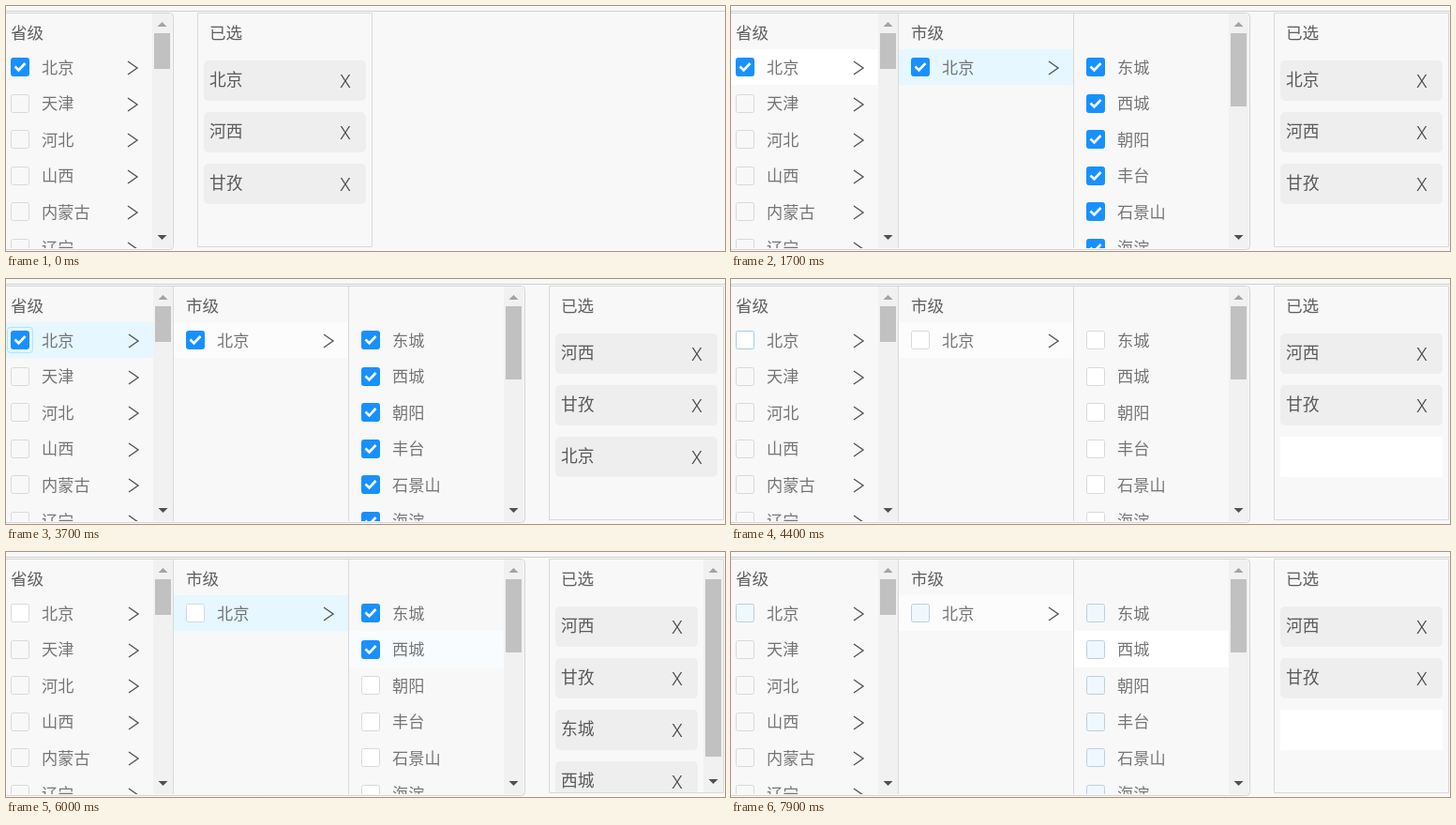
Recreate the animation shown at these times as an HTML page with a canvas. Size 767x261 px, loop 8 s.

```html
<!DOCTYPE html>
<html lang="zh-CN">
<head>
<meta charset="utf-8">
<style>
html, body { margin: 0; width: 100%; height: 100%; overflow: hidden; background: #f8f8f8; }
canvas { display: block; }
</style>
</head>
<body>
<canvas id="stage" width="767" height="261"></canvas>
<script>
const ctx = document.getElementById('stage').getContext('2d');
const LOOP = 8000;
const ROW = 38.5;
const SANS = '"Noto Sans CJK SC", "Noto Sans CJK", sans-serif';
const PLAIN = [248, 248, 248], WHITE = [255, 255, 255], HOVER = [230, 247, 255];
const PALE = [252, 252, 252], BLUE = [24, 144, 255], GREY = [217, 217, 217];
const provinces = ['北京', '天津', '河北', '山西', '内蒙古', '辽宁'];
const districts = ['东城', '西城', '朝阳', '丰台', '石景山', '海淀'];

// Row backgrounds: [time, colour], held until the next key.
const provinceBg = [[0, PLAIN], [500, HOVER], [900, [245, 252, 255]], [1000, WHITE],
  [2600, [240, 250, 255]], [2700, HOVER], [4200, [238, 248, 253]], [4300, [245, 248, 250]], [4400, PLAIN]];
const secondBg = [[0, PLAIN], [300, HOVER], [500, PLAIN]];
const cityBg = [[0, PLAIN], [1200, HOVER], [2600, [245, 251, 254]], [2700, PALE],
  [4700, PLAIN], [5800, HOVER], [6700, [242, 250, 254]], [6800, PALE]];
const eastBg = [[0, PLAIN], [4700, HOVER], [5100, PLAIN]];
const westBg = [[0, PLAIN], [5100, HOVER], [5900, [240, 250, 255]], [6000, [248, 252, 255]], [6700, WHITE]];

// Toggles: [time, checked].
const linked = [[0, 1], [2000, 0], [3500, 1], [4100, 0], [6400, 1], [7800, 0]];
const withPick = time => [...linked.slice(0, 4), [time, 1], [7800, 0]];
const east = withPick(5100), west = withPick(5600);

const tagSets = [
  [0, ['北京', '河西', '甘孜']], [2000, ['河西', '甘孜', '']], [3500, ['河西', '甘孜', '北京']],
  [4100, ['河西', '甘孜', '']], [5100, ['河西', '甘孜', '东城']],
  [5600, ['河西', '甘孜', '东城', '西城']], [6400, ['河西', '甘孜', '北京']], [7800, ['河西', '甘孜', '']]
];

const rgb = c => `rgb(${c.map(Math.round)})`;
const mix = (a, b, k) => a.map((v, i) => v + (b[i] - v) * k);
const keyAt = (keys, t) => keys.filter(k => k[0] <= t).pop();
const valueAt = (keys, t) => keyAt(keys, t)[1];

// How blue a checkbox is, fading over a few ticks after a toggle.
function fillAt(keys, t) {
  const [start, on] = keyAt(keys, t);
  if (!start) return on;
  const fade = on ? [.12, .6] : [.5, .07];
  return fade[Math.round((t - start) / 100)] ?? on;
}

function rect(x, y, w, h, color) {
  ctx.fillStyle = color;
  ctx.fillRect(x, y, w, h);
}

function rounded(x, y, w, h, r, fill, stroke) {
  ctx.beginPath();
  ctx.roundRect(x, y, w, h, r);
  if (fill) { ctx.fillStyle = fill; ctx.fill(); }
  if (stroke) { ctx.strokeStyle = stroke; ctx.lineWidth = 1; ctx.stroke(); }
}

function line(points, color, width) {
  ctx.beginPath();
  points.forEach(([x, y]) => ctx.lineTo(x, y));
  ctx.strokeStyle = color;
  ctx.lineWidth = width;
  ctx.stroke();
}

function text(s, x, y, size, color, family = SANS) {
  ctx.font = `300 ${size}px ${family}`;
  ctx.fillStyle = color;
  ctx.fillText(s, x, y);
}

const title = (s, x) => text(s, x, 34.5, 17.6, '#606060');

function checkbox(x, y, fill, base, edge = GREY) {
  const edgeBlue = fill > .1 ? 1 : fill * 2;
  rounded(x + .5, y + .5, 19, 19, 2, rgb(mix(base, BLUE, fill)), rgb(mix(edge, BLUE, edgeBlue)));
  if (fill > .5) line([[x + 4.5, y + 9.5], [x + 8.5, y + 13.5], [x + 15.5, y + 6]], '#fff', 2.6);
}

// Ring that spreads from a clicked checkbox.
function ripple(x, y, t, start) {
  const size = [20, 25, 28][(t - start) / 100];
  if (!size) return;
  const o = (20 - size) / 2;
  rounded(x + o + .5, y + o + .5, size - 1, size - 1, 3, null, 'rgba(24,144,255,.22)');
}

const chevron = (x, y) => line([[x, y - 6], [x + 10, y + 1], [x, y + 8]], '#555', 1.4);

function arrow(x, y, dir, color) {
  ctx.beginPath();
  ctx.moveTo(x - 5, y - 2.5 * dir);
  ctx.lineTo(x + 5, y - 2.5 * dir);
  ctx.lineTo(x, y + 2.5 * dir);
  ctx.fillStyle = color;
  ctx.fill();
}

function scrollbar(x, bottom, thumb) {
  rect(x, 8, 21, bottom - 8, '#f1f1f1');
  rect(x + 2, 29, 17, thumb, '#c1c1c1');
  arrow(x + 10.5, 19.5, -1, '#a3a3a3');
  arrow(x + 10.5, bottom - 11.5, 1, '#505050');
}

function row(x, i, label, bg, left, width) {
  const y = 46 + i * ROW;
  const top = Math.floor(y);
  if (bg !== PLAIN) rect(left, top, width, Math.floor(y + ROW) - top, rgb(bg));
  text(label, x + 33, y + 25.5, 17.2, '#757575');
  return Math.round(y + 9);
}

function tagPanel(x, t) {
  const tags = valueAt(tagSets, t);
  const scrolls = tags.length > 3;
  const w = scrolls ? 152 : 173;
  rounded(x + .5, 7.5, 186, 249, 0, '#f8f8f8', '#d9d9d9');
  title('已选', x + 13);
  ctx.save();
  ctx.beginPath();
  ctx.rect(x + 1, 8, 185, 248);
  ctx.clip();
  tags.forEach((tag, i) => {
    const y = 58 + i * 55;
    if (!tag) return rect(x + 7, y, w, 43, '#fff');
    rounded(x + 7, y, w, 43, 5, '#eee');
    text(tag, x + 13, y + 27, 17.8, '#5a5a5a');
    text('X', x + w - 21, y + 28.5, 18, '#484848', 'Inter, sans-serif');
  });
  if (scrolls) scrollbar(x + 165, 256, 189);
  ctx.restore();
}

function draw(t) {
  const columns = t < 800 ? 1 : t < 1200 ? 2 : 3;
  const right = [178, 365, 553][columns - 1];
  const shift = columns === 3 ? 0 : -1;
  const fill = fillAt(linked, t);
  const base = t < 4100 ? PLAIN : WHITE;

  rect(0, 0, 767, 261, '#f8f8f8');
  rect(0, 5, 767, 1, '#cfd2cf');
  rounded(-8.5, 7.5, right + 9, 252, 4, '#f8f8f8', '#d4d4d4');

  ctx.save();
  ctx.beginPath();
  ctx.rect(0, 8, right, 250);
  ctx.clip();

  title('省级', 5);
  provinces.forEach((name, i) => {
    const bg = i === 0 ? valueAt(provinceBg, t) : i === 1 ? valueAt(secondBg, t) : PLAIN;
    const y = row(5, i, name, bg, 0, 157 + shift);
    const near = !i && t >= 3300 && t < 5200;
    checkbox(5, y, i ? 0 : fill, i ? PLAIN : base, near ? [165, 203, 238] : GREY);
    chevron(131 + shift, y + 10);
  });
  ripple(5, 55, t, 3500);
  scrollbar(157 + shift, 258, 38);

  if (columns > 1) {
    rect(178, 8, 1, 250, '#d9d9d9');
    title('市级', 192);
    const y = row(192, 0, '北京', valueAt(cityBg, t), 179, 186);
    const near = t >= 1700 && t < 2600;
    checkbox(192, y, fill, near ? [242, 250, 255] : base, near ? [130, 184, 238] : GREY);
    ripple(192, y, t, 6400);
    chevron(339, y + 10);
  }

  if (columns > 2) {
    rect(365, 8, 1, 250, '#d9d9d9');
    districts.forEach((name, i) => {
      const bg = i === 0 ? valueAt(eastBg, t) : i === 1 ? valueAt(westBg, t) : PLAIN;
      const y = row(379, i, name, bg, 366, 165);
      checkbox(379, y, i === 0 ? fillAt(east, t) : i === 1 ? fillAt(west, t) : fill, base);
    });
    scrollbar(531, 258, 78);
  }
  ctx.restore();

  tagPanel([204, 392, 579][columns - 1], t);
}

function tick(now) {
  draw(Math.floor(now % LOOP / 100) * 100);
  requestAnimationFrame(tick);
}
requestAnimationFrame(tick);
</script>
</body>
</html>
```
